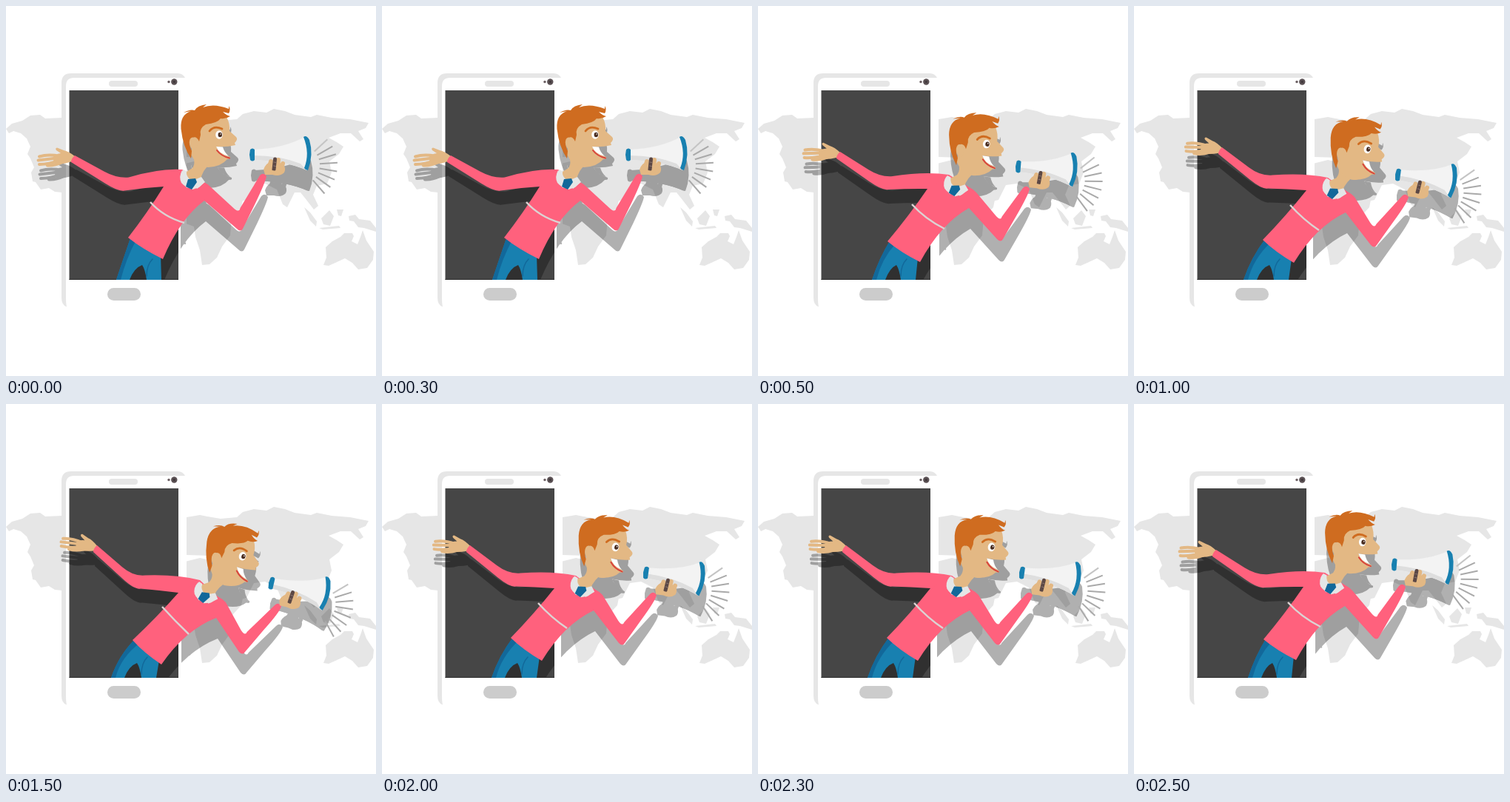
Recreate the animation shown at these times as an HTML page with a canvas. Size 500x500 px, loop 3 s.

```html
<!DOCTYPE html>
<html lang="en">
<head>
<meta charset="utf-8">
<title>Announcement</title>
<style>
  html, body { margin: 0; width: 100%; height: 100%; overflow: hidden; background: #fff; }
  canvas { display: block; }
</style>
</head>
<body>
<canvas id="stage" width="500" height="500"></canvas>
<script>
const stage = document.getElementById('stage').getContext('2d');
const shade = Object.assign(document.createElement('canvas'), { width: 500, height: 500 }).getContext('2d');

const SKIN = '#e3b884', HAIR = '#cf6c20', PINK = '#ff617d', BLUE = '#1880b0';
const NAVY = '#12689a', LAND = '#e6e6e6', SCREEN = '#464646';
const STEP = 500;
const ORDER = [0, 1, 2, 3, 2, 1];

// Joints of the figure in each pose; bezel is where the shadow resumes beside the phone.
const POSES = [
  { turn: 0, bezel: 236, neck: [250, 241], horn: [332, 201], handL: [91, 207], elbowL: [152, 241],
    shoulderL: [238, 221], pitL: [213, 244], hemL: [165, 313], hemR: [212, 342], shoulderR: [272, 240],
    pitR: [268, 263], bendIn: [314, 279], bendOut: [317, 304], wristR: [349, 229],
    stripe: [195, 265, 241, 293], feet: [149, 210] },
  { turn: 5, bezel: 245, neck: [265, 250], horn: [351, 217], handL: [109, 202], elbowL: [168, 239.5],
    shoulderL: [258, 228], pitL: [229, 247], hemL: [175, 318], hemR: [219, 346], shoulderR: [290, 247],
    pitR: [285, 273], bendIn: [327, 290], bendOut: [328, 318], wristR: [364, 246],
    stripe: [208, 268, 252, 301], feet: [154, 213] },
  { turn: 8.5, bezel: 242, neck: [268, 254], horn: [356, 228], handL: [117, 196], elbowL: [173, 238],
    shoulderL: [262, 232], pitL: [233, 249], hemL: [174, 316], hemR: [216, 347], shoulderR: [293, 253],
    pitR: [286, 279], bendIn: [324, 300], bendOut: [325, 326], wristR: [368, 257],
    stripe: [211, 269, 250, 303], feet: [148, 209] },
  { turn: 13.5, bezel: 237, neck: [267, 262], horn: [358, 242], handL: [121, 196], elbowL: [174, 241],
    shoulderL: [262, 238], pitL: [233, 255], hemL: [171, 319], hemR: [210, 352], shoulderR: [292, 263],
    pitR: [284, 289], bendIn: [322, 313], bendOut: [320, 338], wristR: [369, 272],
    stripe: [211, 274, 247, 311], feet: [142, 203] }
];

let g = stage;
let flat = false;

const ink = color => flat ? '#000' : color;
const at = ([x, y], dx = 0, dy = 0) => `${x + dx},${y + dy} `;
const mix = (a, b, k) => [a[0] + (b[0] - a[0]) * k, a[1] + (b[1] - a[1]) * k];

function fill(color, d) {
  g.fillStyle = ink(color);
  g.fill(new Path2D(d));
}

function line(color, width, d, cap = 'round') {
  g.strokeStyle = ink(color);
  g.lineWidth = width;
  g.lineCap = cap;
  g.lineJoin = 'round';
  g.stroke(new Path2D(d));
}

function oval(color, x, y, rx, ry = rx, tilt = 0) {
  g.fillStyle = ink(color);
  g.beginPath();
  g.ellipse(x, y, rx, ry, tilt, 0, Math.PI * 2);
  g.fill();
}

function pill(color, x, y, w, h) {
  g.fillStyle = ink(color);
  g.beginPath();
  g.roundRect(x, y, w, h, h / 2);
  g.fill();
}

// Runs a drawing made around pivot, moved to place and turned.
function pinned(place, pivot, turn, draw) {
  g.save();
  g.translate(...place);
  g.rotate(turn * Math.PI / 180);
  g.translate(-pivot[0], -pivot[1]);
  draw();
  g.restore();
}

function drawMap() {
  // the Americas
  fill(LAND, 'M0,166 L8,159 22,155 33,148 46,147 53,152 76,151 V252 L66,251 58,246 47,248 40,238 ' +
    '36,237 34,225 38,218 33,206 29,200 33,190 28,179 20,172 10,169 4,172Z');
  // Europe and Asia
  fill(LAND, 'M244,153 L262,150 272,152 290,155 312,153 320,146 335,142 352,144 362,139 377,142 390,147 ' +
    '412,150 420,147 440,151 465,153 490,158 486,165 476,169 483,180 478,183 466,172 452,172 436,178 ' +
    '447,184 456,190 450,200 437,210 440,225 434,240 420,243 415,255 422,270 416,275 406,262 398,252 ' +
    '390,252 380,272 374,268 366,248 350,240 335,242 325,262 308,266 298,250 292,235 296,226 275,205 244,204Z');
  // Africa
  fill(LAND, 'M238,214 L262,208 288,214 300,226 308,246 320,262 318,272 305,286 303,310 292,325 ' +
    '285,340 275,349 265,350 262,330 256,312 254,298 238,292Z');
  // islands
  fill(LAND, 'M403,272 L411,279 420,291 419,298 411,290Z M426,287 L437,276 443,284 438,297 429,295Z ' +
    'M423,300 L450,297 452,300 428,302Z M447,275 L456,275 453,284 449,283Z ' +
    'M463,284 L472,282 477,288 492,290 500,300 V305 L484,300 476,299 470,291 464,290Z');
  // Australia
  fill(LAND, 'M429,350 L433,340 432,326 441,318 452,312 457,307 468,307 470,311 467,318 475,322 479,312 ' +
    '482,303 487,317 497,332 496,343 488,354 476,356 468,347 458,341 445,347 436,351Z');
}

function drawPhone() {
  fill('#fff', 'M76,97 H244 V410 H76Z');
  fill(LAND, 'M242,97 Q239,91 232,91 H88 Q75,91 75,104 V394 Q75,404 82,406.500 Q81,402 81,394 V108 Q81,97 92,97Z');
  pill(LAND, 139, 101, 39, 8);
  oval('#6b5f62', 220, 102.500, 1.700);
  oval('#5b5154', 227.300, 102.500, 4.200);
  oval('#40383b', 227.300, 102.500, 1.700);
  fill(SCREEN, 'M85.500,114 H233 V370 H85.500Z');
  line('#2b2b2b', 1, 'M85.500,369.500 H233', 'butt');
  pill('#cccccc', 137, 381, 45, 17);
}

function drawLeftArm(p) {
  const { handL: w, elbowL: e, shoulderL: s, pitL } = p;
  pinned(w, [91, 207], p.turn, () => {
    line(SKIN, 4, 'M73,203 Q57,200 45,203.500 M73,205 L43.500,208.500 M73,208 Q58,214 45,214 M76,211 Q66,216 56,215.500');
    fill(SKIN, 'M93,203 Q84,196 78,195 L69,191.500 Q66,192 68,195 L74,199 Q66,200 63,205 L66,214 Q78,214 89,210Z');
  });
  const top = [w[0] + 2, w[1] - 5], crook = [e[0] - 2, e[1] - 8];
  const under = [w[0] - 3, w[1] + 4], tip = [e[0], e[1] + 10];
  fill(PINK, `M${at(top)} L${at(mix(top, crook, .7))} Q${at(crook)} ${at(e, 14, -9.5)}` +
    `Q${at(mix(e, s, .65), 0, -9)} ${at(s)} L${at(s, 4, 22)} L${at(pitL)}` +
    `Q${at(mix(pitL, e, .45), 0, 3)} ${at(e, 8, 8.5)} Q${at(tip)} ${at(mix(under, tip, .72))}` +
    `L${at(under)} Q${at(w, -3, -1)} ${at(top)}Z`);
}

function drawLegs({ hemL, hemR, feet: [left, right] }) {
  const inner = right - 20;
  fill(BLUE, `M${at(hemL, 4, -2)} Q${left + 10},340 ${left},370 H${left + 18} Q${left + 24},354 ${inner - 6},350 ` +
    `Q${inner - 2},356 ${inner},370 H${right} L${at(hemR, -3, -6)}Z`);
  fill(NAVY, `M${at(hemL, 4, -2)} Q${left + 10},340 ${left},370 h6 Q${left + 13},342 ${at(hemL, 11, 3)}Z`);
  line(NAVY, 1.500, `M${inner},365 Q${inner},350 ${inner + 8},342`);
}

function drawTorso(p) {
  const { shoulderL: s, shoulderR: r, pitL, pitR, hemL, hemR, bendIn, bendOut, wristR: w } = p;
  fill(PINK, `M${at(s)} L${at(r, -6, -3)} Q${at(r)} ${at(r, 5, 5)}` +
    `L${at(mix(r, bendIn, .85))} Q${at(bendIn, 1, 1)} ${at(mix(bendIn, w, .1), -1, -1)}` +
    `L${at(w, -6, 0)} Q${at(w, -1, -5)} ${at(w, 3, 1)} Q${at(w, 2, 8)} ${at(mix(w, bendOut, .5), 4, 0)}` +
    `L${at(bendOut, 3, -3)} Q${at(bendOut, 0, 2)} ${at(bendOut, -5, -3)}` +
    `L${at(pitR)} Q${at(mix(pitR, hemR, .5), -5, -15)} ${at(hemR)}` +
    `Q${at(mix(hemL, hemR, .5), -4, 1)} ${at(hemL)}` +
    `Q${at(mix(hemL, pitL, .5), 2, 1)} ${at(pitL)}Z`);
  const [x1, y1, x2, y2] = p.stripe;
  line('#dcd3d3', 2.500, `M${x1},${y1} Q${x1 + 18},${y1 + 20} ${x2},${y2}`, 'butt');
}

function drawHead() {
  // collar, neck and tie
  fill('#e4e6e6', 'M238,222 Q233,231 237,239 L245,246 251,236 262,233 268,238 261,245 252,248 244,244Z');
  fill(SKIN, 'M249,194 L277,212 Q265,222 263,235 L249,238 Q239,234 244,224 L252,219 Q258,210 249,197Z');
  fill('#e4e6e6', 'M239,221 Q234,232 239,241 L245,245 250,235 Q243,231 244,223Z M252,236 L264,231 269,238 258,247Z');
  fill(NAVY, 'M246,234 L256,233 258,238 251,248 243,244Z');
  // face with an open mouth
  fill(SKIN, 'M256,158 L298,150 Q303,159 302,169 L311,177 Q314,180 309,185 L310,188 Q297,191 284,190 ' +
    'Q288,199 303,204 Q304,207 299,207 Q291,217 273,218 Q258,216 250,201Z');
  fill('#fff', 'M284,190 L293,190.500 Q295,198 301,203 Q288,200 284,190Z');
  line('#d8433c', 2, 'M285,195 Q291,203 302,205.500');
  // hair
  fill(HAIR, 'M250,206 Q239,190 236.500,166 Q235,147 250,142 L240,144 Q249,139 255,141 Q259,134 271,133 ' +
    'L266,137 Q281,131 301,139 L301,135 Q304,140 301,145 L293,143 Q298,148 303,149 ' +
    'Q297,153 290,152 Q286,158 270,160 Q261,165 263,174 L261,183 Q257,174 250,179 Q246,186 251,196Z');
  oval(SKIN, 253, 186, 5, 8.500, -.2);
  line(HAIR, 2.800, 'M275,169 Q281,161 292,166');
  oval('#fff', 288, 174, 4.800, 5.800);
  oval('#4a2d20', 289.300, 174, 2.700, 3.200);
  oval('#fff', 290, 173, .8);
}

function drawRays() {
  const count = 8;
  for (let i = 0; i < count; i++) {
    const a = (-43 + i * 92 / (count - 1)) * Math.PI / 180;
    const point = r => `${397 + r * Math.cos(a)},${215 + r * Math.sin(a)}`;
    line(i ? '#a9a9a9' : '#c4c4c4', 2, `M${point(27)} L${point(51)}`, 'butt');
  }
}

function drawMegaphone() {
  fill('#f3f3f3', 'M334,194 Q378,192 405,176 Q417,198 407,222 Q378,209 334,208Z');
  fill('#dedede', 'M334,202 Q370,202 398,213 L406,222 Q378,209 334,208Z');
  fill(BLUE, 'M402,177 Q406,174 410,181 Q416,201 408,222 Q405,222 403,219 Q411,199 402,177Z');
  fill(BLUE, 'M330,194 Q333,191 336,194 V208 Q333,211 330,208 L329,201Z');
}

function drawFist() {
  line(SKIN, 6, 'M355,220 L358,210 M367,218 L368,208 M372,220 L374,213');
  fill(SKIN, 'M348,221 Q352,210 360,211 L374,213 Q379,219 376,225 Q370,231 360,228 L350,228Z');
  line('#5c4845', 5, 'M363.500,207 L362,221');
  line('#8c7670', 1, 'M362,211 L365,211.500 M361.500,216 L364.500,216.500');
  line(SKIN, 3, 'M355,221 Q361,226 368,223');
}

function drawFigure(p) {
  if (!flat) drawLeftArm(p);
  drawLegs(p);
  drawTorso(p);
  pinned(p.neck, [250, 241], p.turn, drawHead);
  pinned(p.horn, [332, 201], p.turn * .92, () => {
    if (!flat) drawRays();
    drawMegaphone();
    drawFist();
  });
}

function drawShadow(p) {
  g = shade;
  flat = true;
  g.clearRect(0, 0, 500, 500);
  g.save();
  g.translate(2, 19);
  drawLeftArm(p);
  g.translate(0, 9);
  drawFigure(p);
  g.restore();
  g = stage;
  flat = false;

  // The shadow skips the strip of white beside the screen.
  g.save();
  g.beginPath();
  g.rect(0, 0, 233, 369);
  g.rect(p.bezel, 0, 500 - p.bezel, 500);
  g.clip();
  g.globalAlpha = .31;
  g.drawImage(shade.canvas, 0, 0);
  g.restore();
}

function render(p) {
  g.fillStyle = '#fff';
  g.fillRect(0, 0, 500, 500);
  drawMap();
  drawPhone();
  drawShadow(p);
  drawFigure(p);
}

let shown = -1;
function tick() {
  const pose = ORDER[Math.floor(performance.now() / STEP) % ORDER.length];
  if (pose !== shown) {
    shown = pose;
    render(POSES[pose]);
  }
  requestAnimationFrame(tick);
}
tick();
</script>
</body>
</html>
```
